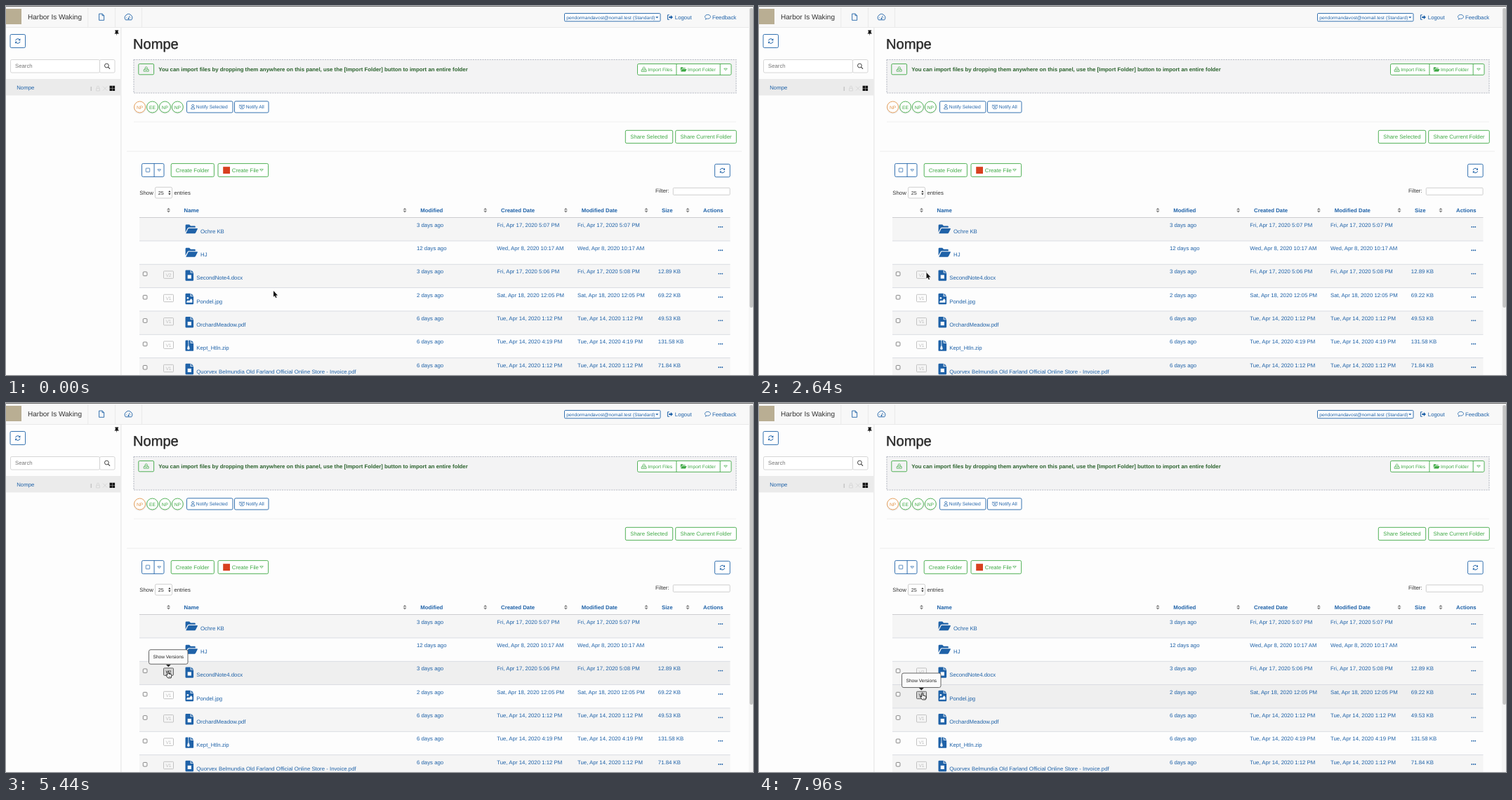
These frames come from a looping animation (1064 px wide and 526 px high, 8 s). An HTML page:

```html
<!DOCTYPE html>
<html lang="en">
<head>
<meta charset="utf-8">
<title>File manager</title>
<style>
html, body { margin: 0; width: 100%; height: 100%; overflow: hidden; background: #fdfdfd; }
svg { display: block; width: 1064px; height: 526px; }
text { font-family: "Liberation Sans", Arial, sans-serif; font-size: 7.8px; text-rendering: geometricPrecision; white-space: pre; }
</style>
</head>
<body>
<svg id="stage" viewBox="0 0 1064 526"></svg>
<script>
const BLUE = '#1f62a8', GREEN = '#3fa945', INK = '#333', GREY = '#bdbdbd';
const SMALL = 6.7, ROW_TOP = 301.5, ROW_H = 33.35, LOOP = 8000;
const rowY = i => ROW_TOP + i * ROW_H;
const out = [];
const put = (...parts) => out.push(...parts);

// Drawing helpers
const rect = (x, y, w, h, fill, stroke = 'none', r = 0, more = '') =>
  `<rect x="${x}" y="${y}" width="${w}" height="${h}" rx="${r}" fill="${fill}" stroke="${stroke}" ${more}/>`;
const text = (x, y, s, fill = INK, size = 7.8, more = '') =>
  `<text x="${x}" y="${y}" fill="${fill}" style="font-size:${size}px" ${more}>${s}</text>`;
const path = (d, fill, stroke = 'none', w = 1, more = '') =>
  `<path d="${d}" fill="${fill}" stroke="${stroke}" stroke-width="${w}" ${more}/>`;
const circle = (x, y, r, fill, stroke = 'none', w = 1) =>
  `<circle cx="${x}" cy="${y}" r="${r}" fill="${fill}" stroke="${stroke}" stroke-width="${w}"/>`;
const at = (x, y, s) => `<g transform="translate(${x} ${y})">${s}</g>`;
const button = (x1, y1, x2, y2, color, r = 1.8) =>
  rect(x1, y1, x2 - x1, y2 - y1, '#fff', color, r, 'stroke-width=".9"');
const bold = 'font-weight="700"', middle = 'text-anchor="middle"';

// Icons, drawn around or from their own origin
const sync = c => path('M-3.2-.7A3.3 3.3 0 0 1 2.7-1.9M3.2.7A3.3 3.3 0 0 1-2.7 1.9', 'none', c, 1) +
  path('M3.6-3.7V-.8H.8ZM-3.6 3.7V.8H-.8Z', c);
const caret = c => path('M-2.3-1.3H2.3L0 1.4Z', 'none', c, .7);
const inbox = c => path('M-3.5 3.2V.7H-1.4L-.7 1.7H.7L1.4.7H3.5V3.2ZM-2.6.5-1.7-1.2M2.6.5 1.7-1.2', 'none', c, .7) +
  circle(0, -1.8, 1.5, 'none', c, .7);
const person = c => circle(0, -1.7, 1.6, 'none', c, .7) +
  path('M-2.6 3.2Q-2.8.4 0 .4T2.6 3.2Z', 'none', c, .7);
const people = c => circle(0, -1.2, 1.3, 'none', c, .6) + circle(-2.8, -1.8, .9, 'none', c, .6) +
  circle(2.8, -1.8, .9, 'none', c, .6) + path('M-2.2 3Q-2 .8 0 .8T2.2 3ZM-4-.1-3 2M4-.1 3 2', 'none', c, .6);
const folder = c => path('M0 11V1.4Q0 0 1.4 0H5.6L7.4 1.9H13Q14.2 1.9 14.2 3V4.3H4.6Q3.6 4.3 3 5.3Z', c) +
  path('M.6 12.8 3.9 6.1Q4.2 5.4 5 5.4H16.6Q17.8 5.4 17.2 6.5L14.4 12Q14 12.8 13 12.8Z', c);
const sheet = path('M1.2 0H7.2V4.2H11.6V14.2Q11.6 15.4 10.4 15.4H1.2Q0 15.4 0 14.2V1.2Q0 0 1.2 0Z', BLUE) +
  path('M8.2 0 11.6 3.4H8.2Z', BLUE);
const sorter = path('M-2.5-.6 0-3.3 2.5-.6ZM-2.5.7H2.5L0 3.4Z', '#858585');
const marks = {
  plain: rect(3.2, 7, 5.2, 5.2, '#fff'),
  image: circle(3.4, 6.6, 1.3, '#fff') + path('M1.8 13V11.4L3.8 9.4 5.1 10.7 8.2 7.5 9.9 9.2V13Z', '#fff'),
  zip: path('M4.3 0V8', 'none', '#fff', 1.5, 'stroke-dasharray="1.2 1.1"') +
    path('M3.4 8.2H5.4L6.2 12.2Q4.4 14.6 2.6 12.2Z', '#fff')
};

function drawHeader() {
  put(rect(0, 0, 1064, 31, '#f8f8f8'), rect(0, 30, 1058, .8, '#e6e6e6'), rect(0, 0, 1064, 1, '#6b6b6b'));
  put(rect(0, 4, 22, 22, '#b9ae93'), text(31, 18.7, 'Harbor Is Waking', INK, 10.03));
  for (const x of [116.5, 155, 193]) put(rect(x, 2, .7, 28, '#e4e4e4'));
  put(at(136, 15.7, path('M-3.4-4.6H1.2L3.6-2.2V4.6H-3.4ZM1-4.4V-2H3.5', 'none', BLUE, .9)));
  put(at(174.5, 16, path('M-4.2 3.8A5.2 5.2 0 1 1 4.2 3.8Z', 'none', BLUE, .9) +
    path('M0 2 1.8-2.2M-3.3.8H-2.5M2.5.8H3.3M-2-2.2-1.6-1.8', 'none', BLUE, .8) + circle(0, 2, 1, BLUE)));
  put(button(795.5, 10.5, 932, 21.8, BLUE, 1.3), text(798.3, 18.6, 'pendormandavost@nomail.test (Standard)', BLUE, SMALL));
  put(path('M925.2 15.3H929.4L927.3 17.5Z', BLUE));
  put(at(946, 16, path('M-1.2-3.2H-3.6V3.2H-1.2', 'none', BLUE, 1) + path('M-1.8-.9H.8V-3L4 0 .8 3V.9H-1.8Z', BLUE)));
  put(text(952.8, 18.7, 'Logout', BLUE));
  put(at(999.5, 15.6, path('M-3.4 3.5Q-2.6 2.7-2.6 1.9Q-4 .9-4-.3C-4-2-2.2-3.2 0-3.2S4-2 4-.3 2.2 2.6 0 2.6Q-.8 2.6-1.4 2.4-2.2 3.4-3.4 3.5Z', 'none', BLUE, .8)));
  put(text(1006, 18.7, 'Feedback', BLUE));
}

function drawSidebar() {
  put(rect(163.5, 31, .8, 495, '#dedede'));
  put(button(6, 40.5, 27.5, 59.5, BLUE), at(16.8, 50, sync(BLUE)));
  put(path('M155.3 34.5H160.1V35.7H159.3L159.7 38 161 39.5H158.1L157.7 42.4 157.3 39.5H154.4L155.7 38 156.1 35.7H155.3Z', '#111'));
  put(rect(6.5, 76.5, 127, 18.5, '#fff', '#ccc', 1.8, 'stroke-width=".8"'), text(13, 88.4, 'Search', '#777'));
  put(rect(133.5, 76.5, 21.5, 18.5, '#fff', '#ccc', 1.8, 'stroke-width=".8"'));
  put(circle(143.4, 85, 2.9, 'none', INK, .9), path('M145.5 87.2 148 89.7', 'none', INK, 1.1));
  put(rect(0, 104, 163.5, 23.5, '#ebebeb'), text(15.2, 118.7, 'Nompe', BLUE));
  put(rect(120.7, 115, 1, 6, '#b5b5b5'), rect(128.5, 117.3, 5, 3.7, 'none', '#cfcfcf', .5, 'stroke-width=".7"'));
  put(path('M129.5 117V115.6A1.5 1.5 0 0 1 132.5 115.6V117M138 114.5 144 120.5M138 120.5 144 114.5', 'none', '#d0d0d0', .7));
  for (const [x, y] of [[147.6, 113.7], [151.5, 113.7], [147.6, 117.5], [151.5, 117.5]]) put(rect(x, y, 3.6, 3.5, '#111'));
}

function drawTop() {
  put(text(181, 61, 'Nompe', '#2b2b2b', 20.1, 'stroke="#2b2b2b" stroke-width=".45"'));
  put(rect(182, 76.5, 858, 47.5, '#f3f3f4', '#b9bcc6', 0, 'stroke-width="1.1" stroke-dasharray="2.2 1.2"'));
  put(rect(188.8, 82.5, 21.8, 15.3, 'none', GREEN, 1.5, 'stroke-width=".9"'), at(199.7, 90, inbox(GREEN)));
  put(text(217.3, 92.6, 'You can import files by dropping them anywhere on this panel, use the [Import Folder] button to import an entire folder', '#2a622c', 7.8, bold));
  put(button(899.5, 82.5, 1033, 98.3, GREEN), rect(954.5, 82.5, .9, 15.8, GREEN), rect(1016.7, 82.5, .9, 15.8, GREEN));
  put(at(908.6, 90.3, inbox(GREEN)), text(914.2, 92.8, 'Import Files', GREEN, SMALL));
  put(`<g transform="translate(960.8 87.2) scale(.5)">${folder(GREEN)}</g>`, text(971, 92.8, 'Import Folder', GREEN, SMALL));
  put(at(1025, 90.4, caret(GREEN)));

  const faces = [['NP', '#e2954a'], ['EE', GREEN], ['NP', GREEN], ['NP', GREEN]];
  faces.forEach(([s, c], i) => {
    const x = 190.6 + i * 17.9;
    put(circle(x, 145, 9, '#ededed'), circle(x, 144, 8, '#fff', c, .9), text(x, 146.5, s, c, SMALL, middle));
  });
  put(button(257.5, 135.8, 323, 152, BLUE), at(266.2, 143.7, person(BLUE)), text(270.8, 146.3, 'Notify Selected', BLUE, SMALL));
  put(button(325.5, 135.8, 374, 152, BLUE), at(336, 143.6, people(BLUE)), text(341.7, 146.3, 'Notify All', BLUE, SMALL));
  put(rect(182, 164.7, 858, .8, '#ebebeb'), rect(172, 206.7, 876, .8, '#e9e9e9'));
  put(button(882.3, 177.3, 949.7, 195.6, GREEN), text(889.2, 188.9, 'Share Selected', GREEN));
  put(button(953.7, 177.3, 1040.3, 195.6, GREEN), text(960.4, 188.9, 'Share Current Folder', GREEN));
}

function drawTools() {
  put(button(193.5, 224.6, 225, 243.4, BLUE), rect(210.6, 224.6, .9, 18.8, BLUE));
  put(rect(199.3, 231.2, 5.4, 5.4, '#fff', BLUE, .5, 'stroke-width=".7"'), at(218.2, 234.2, caret(BLUE)));
  put(button(235.2, 224.6, 296.4, 243.4, GREEN), text(241.7, 236.8, 'Create Folder', GREEN));
  put(button(302, 224.6, 373.6, 243.4, GREEN), rect(309.2, 229.2, 9.8, 9.8, '#d8401f'));
  put(text(321.8, 236.8, 'Create File', GREEN), at(364, 234, caret(GREEN)));
  put(button(1009.6, 225.4, 1031.2, 243.8, BLUE), at(1020.4, 234.6, sync(BLUE)));
  put(text(190.3, 268.7, 'Show'), rect(212.5, 258.3, 24, 15.6, '#fff', '#c4c4c4', 1.8, 'stroke-width=".8"'));
  put(text(216.8, 268.7, '25', INK, 7.2), path('M231.2 265.5 232.9 263 234.6 265.5ZM231.2 267H234.6L232.9 269.5Z', INK));
  put(text(239.4, 268.7, 'entries'), text(925, 266.4, 'Filter:'));
  put(rect(950.3, 259.3, 80.8, 10, '#fff', '#c4c4c4', 1, 'stroke-width=".8"'));
}

const FILES = [
  ['Ochre KB', 'folder', '', '3 days ago', 'Fri, Apr 17, 2020 5:07 PM', 'Fri, Apr 17, 2020 5:07 PM', ''],
  ['HJ', 'folder', '', '12 days ago', 'Wed, Apr 8, 2020 10:17 AM', 'Wed, Apr 8, 2020 10:17 AM', ''],
  ['SecondNote4.docx', 'plain', 'V2', '3 days ago', 'Fri, Apr 17, 2020 5:06 PM', 'Fri, Apr 17, 2020 5:08 PM', '12.89 KB'],
  ['Pondel.jpg', 'image', 'V1', '2 days ago', 'Sat, Apr 18, 2020 12:05 PM', 'Sat, Apr 18, 2020 12:05 PM', '69.22 KB'],
  ['OrchardMeadow.pdf', 'plain', 'V1', '6 days ago', 'Tue, Apr 14, 2020 1:12 PM', 'Tue, Apr 14, 2020 1:12 PM', '49.53 KB'],
  ['Kept_Htln.zip', 'zip', 'V1', '6 days ago', 'Tue, Apr 14, 2020 4:19 PM', 'Tue, Apr 14, 2020 4:19 PM', '131.58 KB'],
  ['Quorvex Belmundia Old Farland Official Online Store - Invoice.pdf', 'plain', 'V1', '6 days ago', 'Tue, Apr 14, 2020 1:12 PM', 'Tue, Apr 14, 2020 1:12 PM', '71.84 KB']
];
const stripe = i => i % 2 ? '#fdfdfd' : '#f5f5f5';

function drawTable() {
  const heads = [[253.5, 'Name'], [590.3, 'Modified'], [705, 'Created Date'], [819.8, 'Modified Date'], [934, 'Size'], [993, 'Actions']];
  for (const [x, s] of heads) put(text(x, 293.7, s, BLUE, 7.8, bold));
  for (const x of [231.5, 568, 682.7, 797.3, 912, 971]) put(at(x, 291, sorter));
  FILES.forEach(([name, kind, version, ago, made, changed, size], i) => {
    const y = rowY(i), cell = y + 13.1;
    put(rect(190, y, 841.5, ROW_H, stripe(i), 'none', 0, `id="row${i}"`));
    put(rect(190, y - .4, 841.5, .9, i ? '#d6d9e0' : '#c9c9cc'));
    if (kind === 'folder') put(at(255.6, y + 10, folder(BLUE)));
    else {
      put(at(255.5, y + 8.2, sheet + marks[kind]));
      put(rect(195.3, y + 10.8, 5.6, 5.6, '#fff', '#666', 1, 'stroke-width=".8"'));
      put(`<g id="ver${i}" fill="none" stroke="${GREY}">` +
        `<rect x="224.5" y="${y + 9.7}" width="14" height="10.4" rx="1" stroke-width=".9"/>` +
        `<text x="231.5" y="${y + 17.4}" style="font-size:6.7px" text-anchor="middle" stroke="none" fill="${GREY}">${version}</text></g>`);
    }
    put(text(kind === 'folder' ? 277 : 271.3, y + 22.2, name, BLUE));
    [[585, ago], [699.3, made], [814, changed], [928.8, size]].forEach(([x, s]) => put(text(x, cell, s, BLUE)));
    for (const dx of [0, 2.5, 5]) put(circle(1015.3 + dx, y + 13.4, .9, BLUE));
  });
}

function drawOverlay() {
  put(rect(1058, 1, 6, 525, '#f5f5f5'), rect(1059.3, 3, 4.7, 427, '#c3c3c3', 'none', 2.2));
  put('<g id="tip">' + path('M227.8 72H234.8L231.3 75.5Z', '#222') +
    rect(203.5, 51, 55.5, 20.5, '#fbfbfb', '#555', 2.5, 'stroke-width=".9"') +
    text(231.3, 63.6, 'Show Versions', '#222', 6.6, middle) + '</g>');
  put('<g id="pointer"><g id="arrow">' +
    path('M0 0V8.6L1.9 6.9 3.2 10 4.6 9.4 3.3 6.4H6Z', '#111', '#fff', .8, 'paint-order="stroke"') + '</g><g id="hand">' +
    path('M-1.2-.3Q-.2-1.5.7-.3V3L4.2 3.8Q5.1 4.1 4.9 5.4L4.1 8.9H-.4L-3 5.6Q-3.2 4.3-1.9 4.6L-1.2 5.2Z', '#fff', '#111', .9) +
    path('M1 6.2V7.7M2.5 6.2V7.7', 'none', '#111', .5) + '</g></g>');
}

drawHeader();
drawSidebar();
drawTop();
drawTools();
drawTable();
drawOverlay();
const stage = document.getElementById('stage');
stage.innerHTML = out.join('');
const el = id => document.getElementById(id);
const [tip, pointer, arrow, hand] = ['tip', 'pointer', 'arrow', 'hand'].map(el);

// Pointer path: time, x, y
const PATH = [[0, 381, 406], [60, 381, 406], [720, 242, 380], [1850, 242, 380], [2250, 238.5, 380], [3400, 238.5, 380],
  [3680, 231, 383], [5720, 231, 383], [6060, 233, 400.7], [6140, 233, 401.2], [6320, 233, 406], [7100, 233, 406], [7540, 233, 414], [LOOP, 233, 414]];
// Version buttons under the pointer; the button relaxes after the pointer leaves
const HOVERS = [
  { row: 2, on: 3580, off: 5900, rest: 6240 },
  { row: 3, on: 7440, off: LOOP + 1, rest: LOOP + 1 }
];
const clamp = v => Math.max(0, Math.min(1, v));

function pointerAt(t) {
  const i = Math.max(1, PATH.findIndex(k => k[0] > t));
  const [a, b] = [PATH[i - 1], PATH[i]];
  const u = clamp((t - a[0]) / (b[0] - a[0])), e = u * u * (3 - 2 * u);
  return [a[1] + (b[1] - a[1]) * e, a[2] + (b[2] - a[2]) * e];
}

function paintVersion(row, over, warm) {
  const [box, label] = el('ver' + row).children;
  box.setAttribute('fill', over ? '#d4d4d4' : warm ? '#ebebeb' : 'none');
  box.setAttribute('stroke', over ? '#555' : warm ? '#999' : GREY);
  label.setAttribute('fill', over ? '#222' : warm ? '#666' : GREY);
}

function render(t) {
  const [x, y] = pointerAt(t);
  pointer.setAttribute('transform', `translate(${x} ${y})`);
  const activeRow = x < 236 ? Math.floor((y - ROW_TOP) / ROW_H) : -1;
  let onButton = false, shown = 0;
  for (const { row, on, off, rest } of HOVERS) {
    const over = t >= on && t < off;
    onButton = onButton || over;
    paintVersion(row, over, t >= on && t < rest);
    el('row' + row).setAttribute('fill', row === activeRow ? '#efefef' : stripe(row));
    const alpha = Math.min(clamp((t - on - 190) / 150), clamp((off + 150 - t) / 150));
    if (alpha > 0) {
      shown = alpha;
      tip.setAttribute('transform', `translate(0 ${rowY(row) - 67.5})`);
    }
  }
  tip.setAttribute('opacity', shown);
  arrow.setAttribute('visibility', onButton ? 'hidden' : 'visible');
  hand.setAttribute('visibility', onButton ? 'visible' : 'hidden');
}

const start = performance.now();
function tick() {
  render((performance.now() - start) % LOOP);
  requestAnimationFrame(tick);
}
tick();
</script>
</body>
</html>
```
